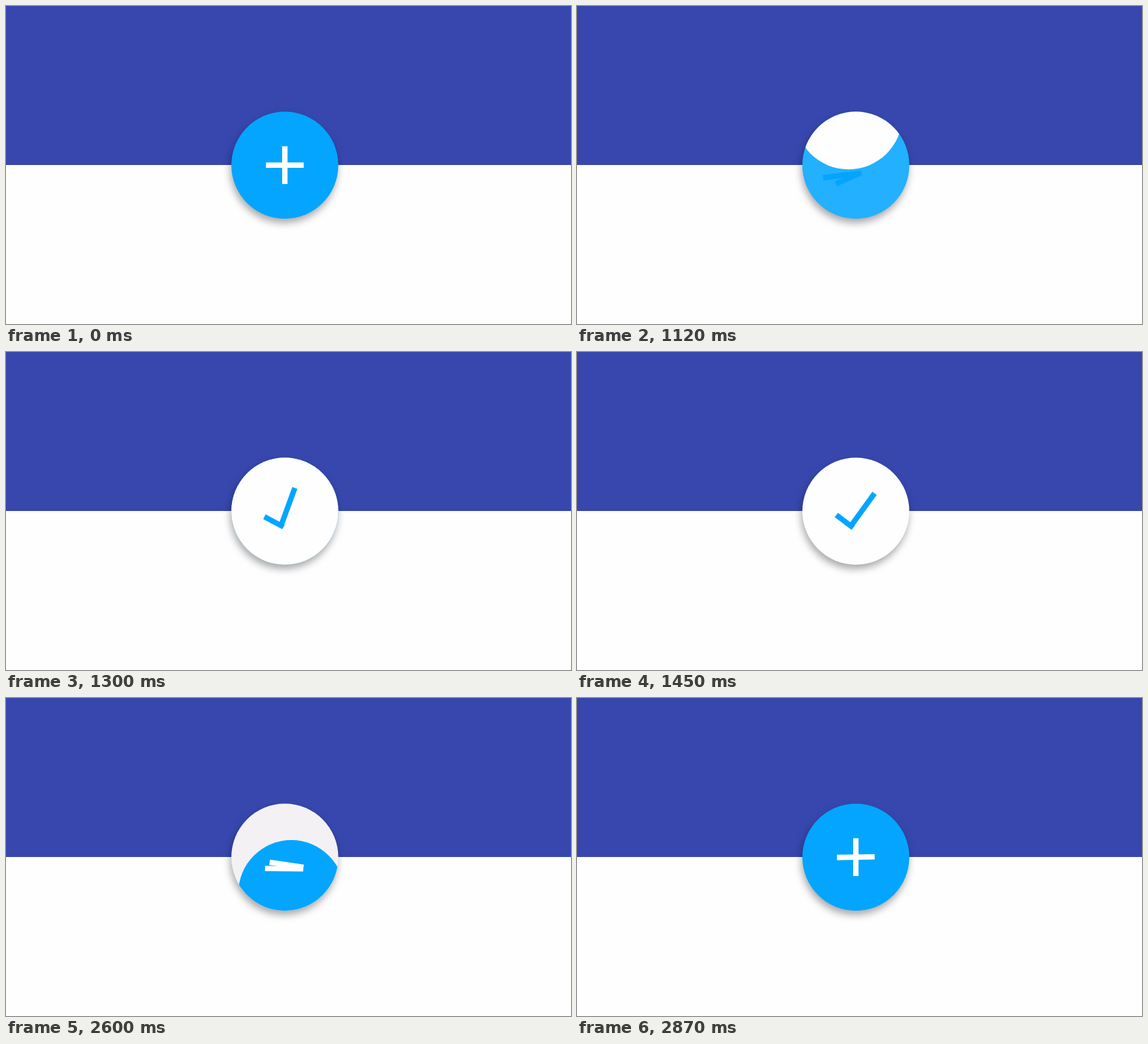
Write an HTML page with a canvas that moves like this. It is 800 px wide and 450 px high and loops after 3.87 s.

```html
<!DOCTYPE html>
<html lang="en">
<head>
<meta charset="utf-8">
<title>Floating button</title>
<style>
  html, body { margin: 0; width: 100%; height: 100%; overflow: hidden; background: #fefefe; }
  canvas { display: block; }
</style>
</head>
<body>
<canvas id="stage" width="800" height="450"></canvas>
<script>
const ctx = document.getElementById('stage').getContext('2d');
const LOOP = 3870, STEP = 30;
const BLUE = '#03a5ff', WHITE = '#fefefe', INDIGO = '#3747ad';
const CENTER = { x: 394.8, y: 225.2 }, RADIUS = 75.7;

// A bar is placed by a pivot: "at" is how far along the bar the pivot sits.
const bar = (x, y, angle, length, at) => ({ x, y, angle, length, at });

const toCheck = {
  start: 1000, duration: 450, power: 2.56, midTime: 210,
  from: BLUE, to: WHITE, veil: '255,255,255', veilRate: 0.00105,
  ripple: { x: 384.5, y: 155, speed: 0.635 },
  short: [bar(0, 0, 90, 53.5, 0.5), bar(2.5, 19.5, 187, 32, 0), bar(-3.7, 23.5, 217, 30, 0)],
  long: [bar(0, 0, 0, 53.5, 0.5), bar(-1, 18, 253, 55, 0), bar(-7, 21, 306, 57, 0)]
};
const toPlus = {
  start: 2450, duration: 420, power: 2.13, midTime: 150,
  from: WHITE, to: BLUE, veil: '40,10,60', veilRate: 0.00035,
  ripple: { x: 404, y: 276, speed: 0.5 },
  short: [bar(-3.7, 23.5, 217, 30, 0), bar(2.5, 10.7, 368.3, 48.5, 0.5), bar(0, 0, 450, 53.5, 0.5)],
  long: [bar(-7, 21, 306, 57, 0), bar(-1, 16.3, 540.5, 54, 0.5), bar(0, 0, 719, 53.5, 0.5)]
};

function mix(a, b, k) {
  const out = {};
  for (const key in a) out[key] = a[key] + (b[key] - a[key]) * k;
  return out;
}

function pose(keys, p, mid) {
  return p < mid ? mix(keys[0], keys[1], p / mid)
                 : mix(keys[1], keys[2], (p - mid) / (1 - mid));
}

function disc(x, y, r, color) {
  ctx.beginPath();
  ctx.arc(x, y, r, 0, Math.PI * 2);
  ctx.fillStyle = color;
  ctx.fill();
}

function drawBar(b, color) {
  ctx.save();
  ctx.translate(CENTER.x + b.x, CENTER.y + b.y);
  ctx.rotate(b.angle * Math.PI / 180);
  ctx.fillStyle = color;
  ctx.fillRect(-b.at * b.length, -3.8, b.length, 7.6);
  ctx.restore();
}

function drawBackdrop(buttonColor) {
  ctx.fillStyle = WHITE;
  ctx.fillRect(0, 0, 800, 450);
  ctx.fillStyle = INDIGO;
  ctx.fillRect(0, 0, 800, 225);
  ctx.save();
  ctx.shadowColor = 'rgba(0,0,0,0.34)';
  ctx.shadowBlur = 11;
  ctx.shadowOffsetX = -1.5;
  ctx.shadowOffsetY = 6;
  disc(CENTER.x, CENTER.y, RADIUS, buttonColor);
  ctx.restore();
}

function drawButton(morph, elapsed) {
  const x = Math.min(1, elapsed / morph.duration);
  const ease = v => 1 - Math.pow(1 - v, morph.power);
  const p = ease(x), mid = ease(morph.midTime / morph.duration);
  drawBackdrop(x < 1 ? morph.from : morph.to);

  if (x < 1) {
    const { ripple } = morph;
    ctx.save();
    ctx.beginPath();
    ctx.arc(CENTER.x, CENTER.y, RADIUS, 0, Math.PI * 2);
    ctx.clip();
    ctx.fillStyle = `rgba(${morph.veil},${elapsed * morph.veilRate})`;
    ctx.fillRect(315, 145, 160, 160);
    disc(ripple.x, ripple.y, elapsed * ripple.speed, morph.to);
    ctx.restore();
  }
  for (const keys of [morph.short, morph.long]) drawBar(pose(keys, p, mid), morph.from);
}

function drawPlus() {
  drawBackdrop(BLUE);
  drawBar(toCheck.short[0], WHITE);
  drawBar(toCheck.long[0], WHITE);
}

function render(t) {
  if (t < toCheck.start) return drawPlus();
  const morph = t < toPlus.start ? toCheck : toPlus;
  drawButton(morph, Math.floor((t - morph.start) / STEP) * STEP);
}

const begin = performance.now();
function tick() {
  render((performance.now() - begin) % LOOP);
  requestAnimationFrame(tick);
}
render(0);
requestAnimationFrame(tick);
</script>
</body>
</html>
```
